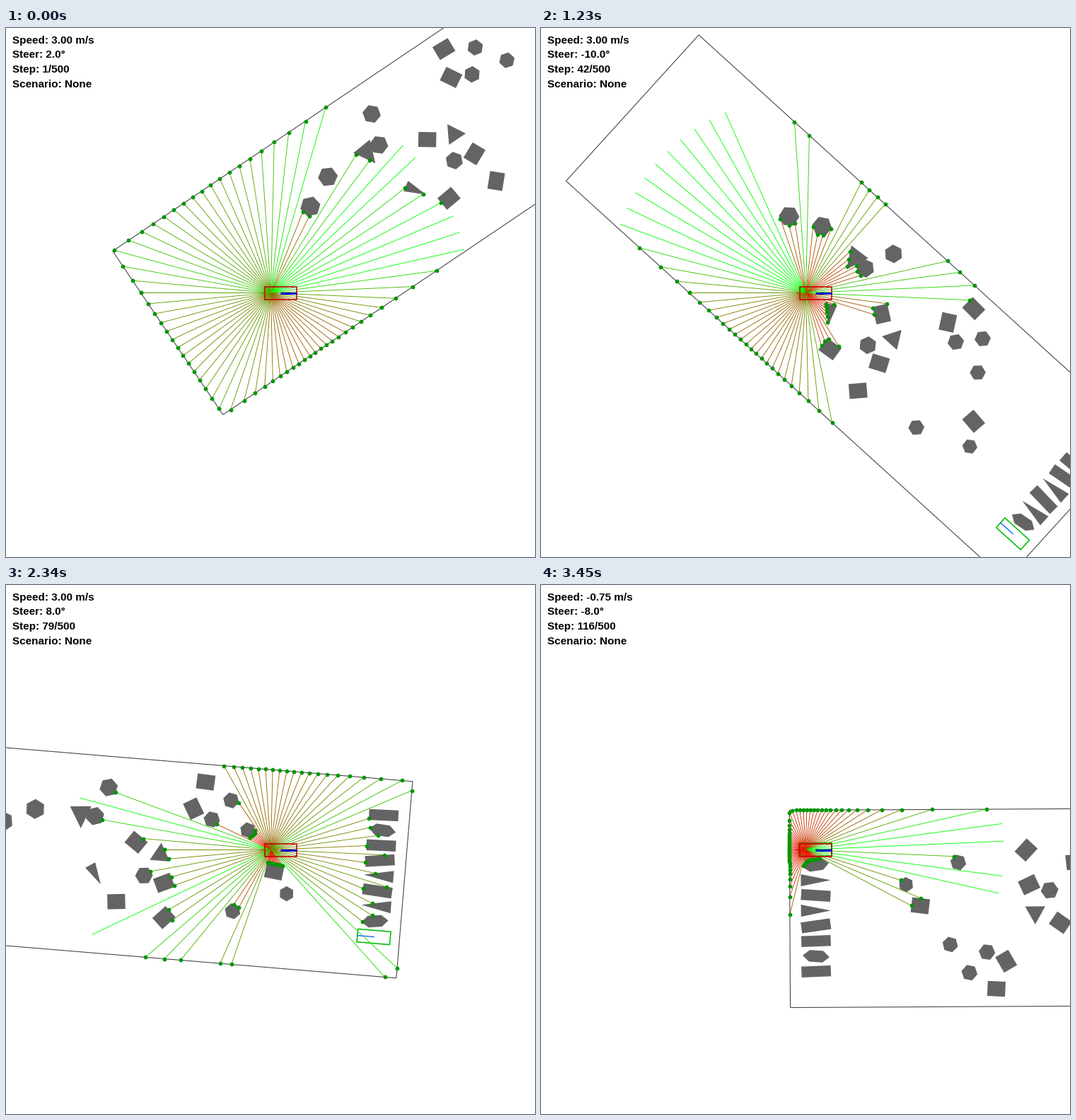
Animation of 748 by 748 pixels, one loop 3.48 s. Source, as a matplotlib script:

```python
import numpy as np
import matplotlib.pyplot as plt
from matplotlib.animation import FuncAnimation
from matplotlib.collections import LineCollection, PolyCollection

SIZE, DPI = 748, 100
FRAMES, INTERVAL = 116, 30
PX = 72 / DPI                      # points per pixel
CENTRE = np.array([374.0, 374.0])  # rear axle on screen
REACH, RAYS = 280, 72
LENGTH, WIDTH = 839.5, 279.0       # walled yard
CRUISE, CRAWL, FULL_LOCK = 3.0, 0.75, 30

# Poses the drive passes through: frame, x, y, heading, steer
POSES = np.array([
    (0, 152.4, 174, 34, 2),
    (14, 276.3, 166.9, -7.8, -24),
    (25, 371, 191, -4, 6),
    (30, 327, 194, -4, -2),
    (33, 299, 196, -3, 4),
    (53, 432.2, 92.7, -36.2, -30),
    (68, 557.4, 115.4, 11.6, 18),
    (88, 728.6, 130.1, 40.4, 0),
    (102, 703.5, 222.5, 180.3, 16),
    (115, 816.4, 222.9, 180.3, -8),
])


def ngon(n):
    turn = 2 * np.pi * np.arange(n) / n
    return np.column_stack([np.cos(turn), np.sin(turn)])


BOX = np.array([(-1, -1), (1, -1), (1, 1), (-1, 1)])
TRI = np.array([(2 / 3, 0), (-1 / 3, 0.5), (-1 / 3, -0.5)])
HEX = ngon(6)


def rotate(points, angle):
    c, s = np.cos(angle), np.sin(angle)
    return np.asarray(points) @ np.array([(c, s), (-s, c)])


def place(unit, x, y, w, h, deg=0):
    return rotate(unit * (w, h), np.radians(deg)) + (x, y)


def scattered():
    blocks = [(548, 25, 3), (534, 64, 60), (457, 118, 35), (501, 172, -25),
              (505, 221, -47), (436, 204, -6), (655, 143, 7)]
    stones = [(267, 104), (311, 83), (396, 86), (412, 44), (472, 164),
              (561, 77), (586, 48), (601, 204), (613, 88), (675, 173)]
    shapes = [place(BOX, x, y, 12.6, 10.6, deg) for x, y, deg in blocks]
    # stones get smaller and turn further along the yard
    for x, y in stones:
        r = 17 - x / 107
        shapes.append(place(HEX, x, y, r, r, 0.16 * x - 82))
    shapes.append(place(TRI, 492.6, 132.8, 25.4, 28.5, -90))
    shapes.append(place(TRI, 375.6, 84.2, 31, 30, 85))
    shapes.append(place(TRI, 400.7, 164.2, 31, 16, 57))
    return shapes


def parked():
    shapes = []
    for i, kind in enumerate("RHRRTRTH"):
        x, y = 802.7, 50.9 + 21.5 * i
        tilt = 6 * np.sin(i * np.pi / 2) - 2
        if kind == "R":
            shapes.append(place(BOX, x, y, 20.8, 7.7, tilt))
        elif kind == "H":
            shapes.append(place(HEX, x, y, 19, 9.5, tilt))
        else:
            shapes.append(place(TRI, x + 7, y, 42, 17, 180))
    return shapes


obstacles = scattered() + parked()
yard = (BOX + 1) / 2 * (LENGTH, WIDTH)
bay = place(BOX, 803, 223.5, 23.3, 9.2)
bay_nose = np.array([(803, 223.5), (779.7, 223.5)])


def pose(frame):
    """Position, heading and gear on a curve tangent to the headings."""
    k = min(np.searchsorted(POSES[:, 0], frame, side="right"), len(POSES) - 1) - 1
    a, b = POSES[k], POSES[k + 1]
    u = (frame - a[0]) / (b[0] - a[0])
    h0, h1 = np.radians((a[3], b[3]))
    d0, d1 = (np.array([np.cos(h), np.sin(h)]) for h in (h0, h1))
    chord = b[1:3] - a[1:3]
    gear = np.sign(chord @ (d0 + d1))
    pull = gear * np.hypot(*chord) / np.cos((h1 - h0) / 4) ** 2
    pos = (a[1:3] + (3 * u**2 - 2 * u**3) * chord
           + pull * ((u**3 - 2 * u**2 + u) * d0 + (u**3 - u**2) * d1))
    vel = ((6 * u - 6 * u**2) * chord
           + pull * ((3 * u**2 - 4 * u + 1) * d0 + (3 * u**2 - 2 * u) * d1))
    vx, vy = gear * vel
    return pos, np.arctan2(vy, vx), gear


def readout(frame, gear):
    steer = 2 * int(round(np.interp(frame, POSES[:, 0], POSES[:, 4]) / 2))
    slow = abs(steer) >= FULL_LOCK or frame == FRAMES - 1
    speed = gear * (CRAWL if slow else CRUISE)
    return (f"Speed: {speed:.2f} m/s", f"Steer: {steer:.1f}°",
            f"Step: {frame + 1}/500", "Scenario: None")


def cross(p, q):
    return p[..., 0] * q[..., 1] - p[..., 1] * q[..., 0]


angles = np.linspace(-np.pi, np.pi, RAYS)
beams = np.column_stack([np.cos(angles), np.sin(angles)])


def scan(shapes):
    """Distance along each beam to the nearest edge, up to the reach."""
    start = np.vstack(shapes) - CENTRE
    edge = np.vstack([np.roll(s, -1, axis=0) for s in shapes]) - CENTRE - start
    d = beams[:, None]
    det = cross(d, edge)
    det = np.where(np.abs(det) < 1e-9, 1e-9, det)
    t = cross(start, edge) / det
    u = cross(start, d) / det
    hit = (t > 0) & (u >= 0) & (u <= 1)
    return np.minimum(np.where(hit, t, REACH).min(axis=1), REACH)


fig = plt.figure(figsize=(SIZE / DPI, SIZE / DPI), dpi=DPI, facecolor="white")
ax = fig.add_axes([0, 0, 1, 1])
ax.set_xlim(-0.5, SIZE - 0.5)
ax.set_ylim(SIZE - 0.5, -0.5)
ax.axis("off")


def outline(points, color, width, z):
    return ax.add_patch(plt.Polygon(points, fill=False, ec=color, lw=width * PX,
                                    zorder=z))


wall = outline(yard, "#464646", 1.1, 1)
blocks = ax.add_collection(PolyCollection(obstacles, facecolors="#646464",
                                          edgecolors="none", zorder=2))
bay_box = outline(bay, "#00be00", 1.6, 3)
bay_line, = ax.plot([], [], color="#1478ff", lw=1.5 * PX, zorder=3)
rays = ax.add_collection(LineCollection([], linewidths=0.9 * PX, zorder=4))
dots, = ax.plot([], [], "o", color="#009600", ms=5.8 * PX, mew=0, zorder=5)
outline(place(BOX, 388.2, 374.7, 22.8, 9.3), "#c80000", 1.6, 6)
ax.plot([388, 411], [374.5, 374.5], color="#0000c8", lw=3 * PX,
        solid_capstyle="butt", zorder=6)
labels = [ax.text(9, 21.5 + 20.5 * i, "", family="Liberation Sans", weight="bold",
                  size=15.3 * PX, va="baseline", zorder=7) for i in range(4)]


def draw(frame):
    pos, heading, gear = pose(frame)

    def view(points):
        return rotate(points - pos, -heading) + CENTRE

    shapes = [view(s) for s in obstacles]
    border = view(yard)
    wall.set_xy(border)
    blocks.set_verts(shapes)
    bay_box.set_xy(view(bay))
    bay_line.set_data(*view(bay_nose).T)

    dist = scan(shapes + [border])
    ends = CENTRE + beams * dist[:, None]
    share = dist / REACH
    rays.set_segments([(CENTRE, e) for e in ends])
    rays.set_color(np.column_stack([1 - share, share, 0 * share]))
    dots.set_data(*ends[dist < REACH].T)

    for label, text in zip(labels, readout(frame, gear)):
        label.set_text(text)
    return [wall, blocks, bay_box, bay_line, rays, dots, *labels]


anim = FuncAnimation(fig, draw, frames=FRAMES, interval=INTERVAL, repeat=True,
                     repeat_delay=0, blit=False)
plt.show()
```
